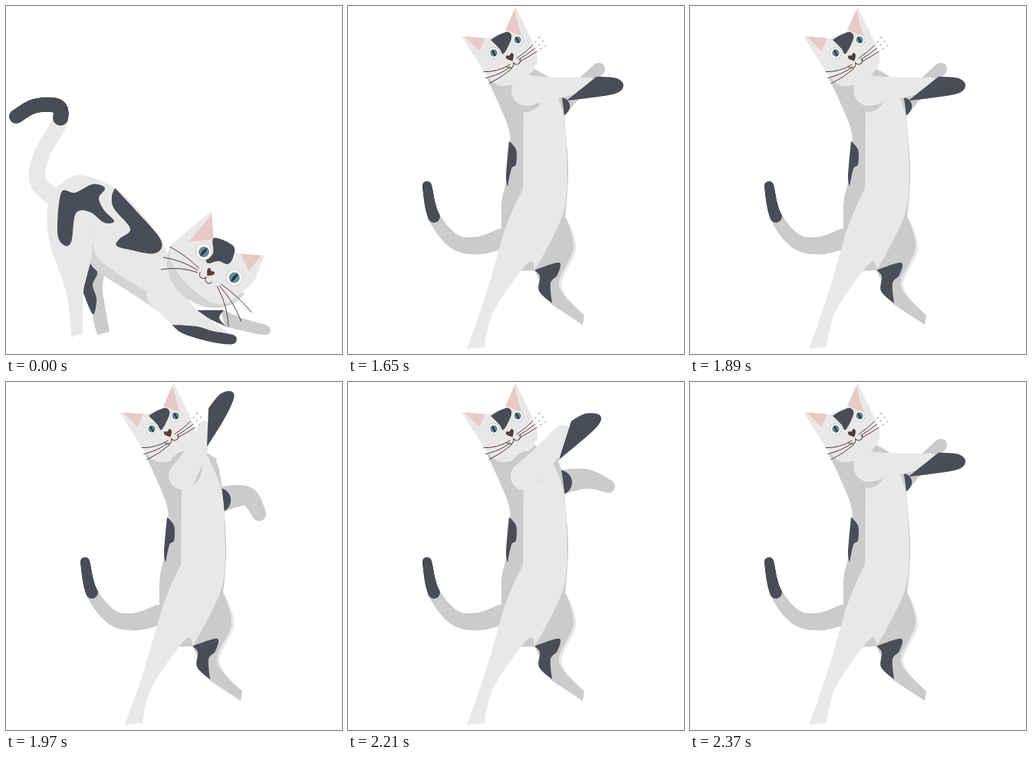
Recreate the animation shown at these times as an HTML page with a canvas. Size 438 by 453 pixels, loop 2.45 s.

```html
<!DOCTYPE html>
<html lang="en">
<head>
<meta charset="utf-8">
<title>Dancing cat</title>
<style>
html, body { margin: 0; width: 100%; height: 100%; overflow: hidden; background: #fff; }
canvas { display: block; }
</style>
</head>
<body>
<canvas id="stage" width="438" height="453"></canvas>
<script>
const ctx = document.getElementById('stage').getContext('2d');
const LIGHT = '#e8e8e8', SHADE = '#d4d4d4', GREY = '#cbcbcb', DARK = '#4a4c57';
const PINK = '#e8c9c5', BROWN = '#593c3c';
const LOOP = 2450, REST = 1490, STEP = 80;
const DANCE = 'UMDUMDUMDMUD'; // arms up, middle, down

const mix = (a, b, k) => a + (b - a) * k;
const between = (p, q, k) => [mix(p[0], q[0], k), mix(p[1], q[1], k)];

// Reads "x,y" points; a trailing "!" marks a corner.
const parse = text => text.trim().split(/\s+/).map(s => [...s.replace('!', '').split(',').map(Number), s.endsWith('!')]);

// Samples a smooth curve through the points.
function curve(points, closed, steps = 12) {
  const n = points.length, out = [];
  const at = i => closed ? points[(i + n) % n] : points[Math.max(0, Math.min(n - 1, i))];
  const slope = (i, axis) => at(i)[2] ? 0 : (at(i + 1)[axis] - at(i - 1)[axis]) / 2;
  for (let i = 0; i < n - (closed ? 0 : 1); i++) {
    for (let s = 0; s <= steps; s++) {
      const t = s / steps, ease = t * t * (3 - 2 * t);
      out.push([0, 1].map(axis => mix(at(i)[axis], at(i + 1)[axis], ease)
        + slope(i, axis) * t * (1 - t) ** 2 - slope(i + 1, axis) * t * t * (1 - t)));
    }
  }
  return out;
}

function shape(color, points) {
  ctx.beginPath();
  curve(typeof points === 'string' ? parse(points) : points, true).forEach(p => ctx.lineTo(...p));
  ctx.fillStyle = color;
  ctx.fill();
}

function oval(x, y, rx, ry, color, angle = 0, end = 7) {
  ctx.beginPath();
  ctx.ellipse(x, y, rx, ry, angle, 0, end);
  ctx.fillStyle = color;
  ctx.fill();
}

// A tapered limb from radius r0 to r1; its first part, up to `split`, is dark.
function limb(color, text, r0, r1, split = 0) {
  const spine = curve(parse(text), false, 24), last = spine.length - 1;
  const paint = (fill, end) => spine.forEach(([x, y], i) => {
    const r = mix(r0, r1, i / last);
    if (i / last <= end) oval(x, y, r, r, fill);
  });
  paint(color, 1);
  if (split) paint(DARK, split);
}

function whiskers(x, y, angle, spread, length, bend, dash = []) {
  ctx.strokeStyle = BROWN;
  ctx.lineWidth = 1;
  ctx.setLineDash(dash);
  for (const i of [-1, 0, 1]) {
    const a = angle + i * spread, c = Math.cos(a), s = Math.sin(a), half = length / 2;
    ctx.beginPath();
    ctx.moveTo(x - s * i * 3, y + c * i * 3);
    ctx.quadraticCurveTo(x + c * half - s * bend, y + s * half + c * bend, x + c * length, y + s * length);
    ctx.stroke();
  }
  ctx.setLineDash([]);
}

// Mirrored about its own axis: `turn` shifts the features, `lean` skews the skull.
function head({ x, y, tilt, turn, lean, wide, chin, ear, up, gap }, patch) {
  const sides = [1, -1].map(s => ({
    s,
    cheek: [s * wide * .8, chin * .77],
    base: [s * wide, lean * s * wide, true],
    tip: [s * ear, -up, true],
    inner: [s * wide * .3, lean * s * wide * .3 - up * .48, true]
  }));
  const [r, l] = sides;

  ctx.save();
  ctx.translate(x, y);
  ctx.rotate(tilt);
  shape(LIGHT, [[0, chin], r.cheek, r.base, r.tip, r.inner, l.inner, l.tip, l.base, l.cheek].map((p, i) => i ? p : [0, chin]));
  for (const { base, tip, inner } of sides) {
    shape(PINK, [between(tip, inner, .12), between(inner, tip, .1), between(base, inner, .35)].map(p => [...p, true]));
  }
  ctx.restore();
  shape(DARK, patch);

  ctx.save();
  ctx.translate(x, y);
  ctx.rotate(tilt);
  ctx.translate(turn, 0);
  const size = gap * .39;
  for (const { s } of sides) {
    oval(s * gap, 0, size + .6, size + .6, '#c9b9a9');
    oval(s * gap, 0, size, size, '#fdfbf6');
    oval(s * gap, 0, size * .68, size * .68, '#628c9d');
    oval(s * gap, 0, size * .17, size * .66, '#2b3039');
  }
  ctx.translate(-turn / 3, 15);
  shape(BROWN, '0,-2! 4,-4 5,0 0,6! -5,0 -4,-4');
  ctx.strokeStyle = BROWN;
  ctx.lineWidth = 1;
  for (const { s } of sides) {
    ctx.beginPath();
    ctx.arc(s * 5, 8, 5, 0, Math.PI);
    ctx.stroke();
  }
  ctx.restore();
}

function stretch() {
  // far legs
  shape(GREY, '111,331! 127,347 126,371 135,424! 119,428! 112,395');
  shape(DARK, '111,331! 119,347 113,363 118,382 113,401 100,371!');
  shape(GREY, '279,394! 310,407 342,417 339,428 305,422 286,417!');
  shape(DARK, '249,396! 284,396! 278,406 287,417! 265,407');

  // body and tail
  limb(LIGHT, '13,144 38,130 68,131 69,153 47,192 41,227 62,249', 9, 11, .46);
  shape(LIGHT, `66,236! 95,220 142,237 175,268 203,304! 230,370 249,396! 298,431! 217,415!
    185,387 119,345 111,331! 101,371 100,427! 85,431! 79,375 56,305 55,255`);
  shape(SHADE, '115,285! 120,328 184,372! 187,387 217,415! 185,388 119,345 111,331!');
  shape(DARK, `72,243 90,243 113,232 129,237 121,250 128,266 141,280 128,282 109,268 91,270
    85,307 75,311 67,294`);
  shape(DARK, '142,237! 170,267 202,305 194,322 160,317 144,312 148,303 162,290 141,264 138,248');
  shape(DARK, '217,415! 248,417 269,423 298,429 296,440 266,437 230,426');

  oval(264, 342, 57, 48, SHADE, .6, Math.PI);
  head({ x: 272, y: 332, tilt: .7, turn: 7.6, lean: -.26, wide: 56, chin: 47, ear: 45, up: 47, gap: 26 },
    '271,302 296,312 296,327 289,336 277,332 264,335 261,330 270,322');
  whiskers(250, 344, 3.5, .34, 48, 5);
  whiskers(278, 364, 1.02, .33, 55, -5);
}

const arms = {
  U: {
    far: ['270,156 296,149 317,150 330,172', 17, 9],
    near: ['230,122 250,88 259,58', 18, 7],
    paw: '264,34! 279,16 293,12 297,21 284,49 262,84!'
  },
  M: {
    far: ['270,132 310,126 340,136', 17, 8],
    near: ['230,123 257,95 280,68', 18, 12],
    paw: '291,51! 310,41 329,44 322,61 275,101!'
  },
  D: {
    far: ['275,134 300,108 327,82', 11, 8],
    near: ['233,110 270,107 314,101', 20, 8],
    paw: '324,92! 350,94 359,104 345,115 285,123!'
  }
};

function dance({ far, near, paw }) {
  limb(GREY, ...far, .12);
  limb(GREY, '103,234 112,274 138,306 168,312 200,303', 6, 13, .26);

  // shaded back and right leg
  shape(GREY, '181,94! 208,155 211,185 206,228 200,260 201,322! 240,240! 275,100! 240,80!');
  shape(DARK, '210,176! 219,187 219,206 213,212 208,235! 206,220');
  shape(GREY, `262,93! 278,115 287,210 283,274! 297,315 278,365 308,402! 306,415! 265,388! 243,344!
    222,345!`);
  shape(LIGHT, '283,274! 297,315 278,365 308,402! 275,364 294,315');
  shape(DARK, '243,344! 275,334 273,350 264,361 266,387! 249,371 250,352');

  // torso and left leg
  shape(LIGHT, `262,95! 280,138 285,190 281,268 243,344! 234,335 190,397 178,444! 155,446!
    180,375 206,287 228,238! 229,135!`);

  head({ x: 202, y: 54.5, tilt: -.5, turn: 4, lean: .16, wide: 38, chin: 49, ear: 40, up: 39, gap: 17.7 },
    '186,44! 198,37 209,34 213,42 203,62 197,55');
  whiskers(212, 79, 2.72, .24, 36, -4);
  whiskers(222, 70, -.66, .17, 44, 3, [27, 5, 2, 5, 2, 5]);

  oval(233, 114, 22, 25, GREY, .5);
  limb(LIGHT, ...near);
  shape(DARK, paw);
}

function frame(now) {
  const t = now % LOOP;
  ctx.clearRect(0, 0, 438, 453);
  if (t < REST) stretch();
  else dance(arms[DANCE[Math.floor((t - REST) / STEP)]]);
  requestAnimationFrame(frame);
}

requestAnimationFrame(frame);
</script>
</body>
</html>
```
